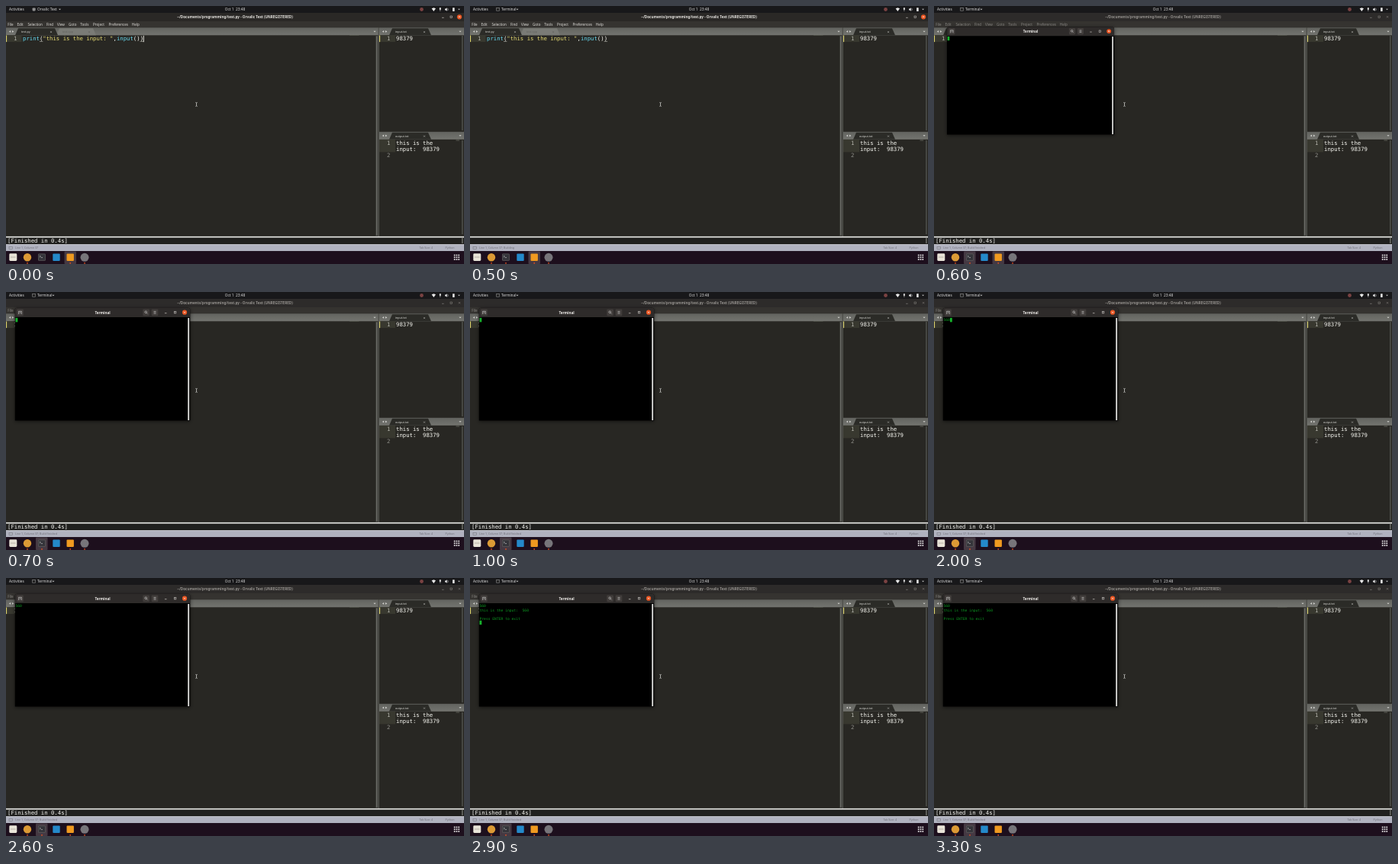
These frames come from a looping animation (600 by 338 pixels, 3400 ms). An HTML page with a canvas:

```html
<!DOCTYPE html>
<html lang="en">
<head>
<meta charset="utf-8">
<title>Editor build opening a terminal</title>
<style>
html, body { margin: 0; width: 100%; height: 100%; overflow: hidden; background: #282723; }
canvas { display: block; }
</style>
</head>
<body>
<canvas id="stage" width="600" height="338"></canvas>
<script>
const ctx = document.getElementById('stage').getContext('2d');
const LOOP = 3400, STEP = 100;
const SANS = '"Noto Sans", "Open Sans", sans-serif';
const MONO = '"DejaVu Sans Mono", "Liberation Mono", monospace';
const CODE = 7.29, CHAR = 4.39;      // editor font size and advance
const SHELL = 4.68, CELL = 2.82, ROW = 5.45;
const APP = 'Orvalic Text';
const ORANGE = '#e95420';

function rect(x, y, w, h, color) {
  ctx.fillStyle = color;
  ctx.fillRect(x, y, w, h);
}

function round(x, y, w, h, r, color) {
  ctx.fillStyle = color;
  ctx.beginPath();
  ctx.roundRect(x, y, w, h, r);
  ctx.fill();
}

function dot(x, y, r, color) {
  ctx.fillStyle = color;
  ctx.beginPath();
  ctx.arc(x, y, r, 0, 7);
  ctx.fill();
}

function poly(color, ...p) {
  ctx.fillStyle = color;
  ctx.beginPath();
  for (let i = 0; i < p.length; i += 2) ctx.lineTo(p[i], p[i + 1]);
  ctx.fill();
}

function line(color, width, ...p) {
  ctx.strokeStyle = color;
  ctx.lineWidth = width;
  ctx.beginPath();
  for (let i = 0; i < p.length; i += 2) ctx.lineTo(p[i], p[i + 1]);
  ctx.stroke();
}

function text(s, x, y, size, color, { font = SANS, weight = 400, align = 'left' } = {}) {
  ctx.font = `${weight} ${size}px ${font}`;
  ctx.textAlign = align;
  ctx.fillStyle = color;
  ctx.fillText(s, x, y);
}

const code = (s, x, y, color = '#f8f8f2') => text(s, x, y, CODE, color, { font: MONO });
const down = (x, y, color, r = 1.6) => poly(color, x - r, y - r / 2, x + r, y - r / 2, x, y + r / 2);

function cross(x, y, r, color, width = .6) {
  line(color, width, x - r, y - r, x + r, y + r);
  line(color, width, x + r, y - r, x - r, y + r);
}

function windowButtons(x, y, gap, color, active) {
  line(color, .7, x - 2 * gap - 1.3, y + 1, x - 2 * gap + 1.3, y + 1);
  ctx.strokeStyle = color;
  ctx.lineWidth = .6;
  ctx.strokeRect(x - gap - 1.2, y - 1.2, 2.4, 2.4);
  if (active) dot(x, y, 3.1, ORANGE);
  cross(x, y, 1.1, active ? '#fff' : color);
}

function topBar(app) {
  rect(0, 0, 600, 9, '#18181a');
  text('Activities', 4, 6.3, 4.75, '#dcdcdc');
  if (app === 'Terminal') {
    round(34, 2, 5, 4.6, .8, '#8a8a8a');
    rect(34.6, 2.7, 3.8, 3.2, '#222');
  } else {
    round(34.6, 2.4, 4, 4, .8, '#909090');
  }
  text(app, 41, 6.3, 4.75, '#dcdcdc');
  down(app === 'Terminal' ? 62 : 70.5, 4.4, '#ccc', 1.5);
  text('Oct 1  23:48', 300, 6.3, 4.75, '#dcdcdc', { align: 'center' });
  dot(544.5, 4.5, 2.4, '#7a4242');
  poly('#e8e8e8', 557.6, 3.3, 560.3, 2.2, 563, 3.3, 560.3, 6.9);
  round(567.8, 1.9, 2, 3.4, 1, '#ddd');
  line('#ddd', .5, 568.8, 5, 568.8, 7);
  poly('#ddd', 575, 3.6, 576.2, 3.6, 577.8, 2.2, 577.8, 6.8, 576.2, 5.4, 575, 5.4);
  line('#ddd', .5, 578.8, 3, 579.3, 4.5, 578.8, 6);
  round(585, 2.2, 2.7, 4.8, .4, '#ddd');
  down(593.5, 4.5, '#ccc', 1.5);
}

function titleAndMenu(focused) {
  const bright = focused ? '#e6e4e0' : '#96938f';
  rect(0, 9, 600, 11, focused ? '#2a2826' : '#2d2b2a');
  text(`~/Documents/programming/test.py - ${APP} (UNREGISTERED)`, 300, 16.1, 4.58, bright,
    { weight: 700, align: 'center' });
  windowButtons(594, 14.3, 10.8, focused ? '#c8c6c2' : '#85827e', focused);
  rect(0, 20, 600, 8.5, '#353330');
  const menu = { File: 2.3, Edit: 14.4, Selection: 28.4, Find: 53, View: 67, Goto: 82,
    Tools: 97.3, Project: 114, Preferences: 134.6, Help: 164.8 };
  for (const name in menu) text(name, menu[name], 25.8, 4.55, focused ? '#dedcd8' : '#8a8884');
}

function tab(x, w, y, label, active) {
  const fill = active ? '#2b2b27' : '#7a7b76';
  poly(fill, x, y + 10, x + 4, y + 1, x + w - 4, y + 1, x + w, y + 10);
  text(label, x + 8, y + 7.1, 3.75, active ? '#dededa' : '#62635e');
  cross(x + w - 9, y + 5.8, 1, active ? '#c4c4c0' : '#5c5d58', .5);
}

function strip(x, w, y) {
  const g = ctx.createLinearGradient(0, y, 0, y + 10);
  g.addColorStop(0, '#62635f');
  g.addColorStop(1, '#73746f');
  rect(x, y, w, 10, g);
  poly('#d0d0cc', x + 6.2, y + 3.7, x + 6.2, y + 6.5, x + 3.8, y + 5.1);
  poly('#d0d0cc', x + 8, y + 3.7, x + 8, y + 6.5, x + 10.4, y + 5.1);
  down(x + w - 5, y + 5.2, '#dededa');
}

function editors(caret) {
  rect(0, 28, 600, 274, '#282723');
  strip(0, 488, 28.3);
  tab(66, 52, 28.3, 'test.cpp', false);
  tab(12, 56, 28.3, 'test.py', true);
  strip(489, 111, 28.3);
  tab(502, 55, 28.3, 'input.txt', true);
  strip(489, 111, 164.8);
  tab(502, 55, 164.8, 'output.txt', true);

  // minimaps
  rect(450, 38.2, 12.5, .7, '#55564f');
  rect(589.5, 175.4, 4.5, 1.2, '#55564f');

  // gutters
  rect(0, 38.5, 20.5, 8.6, '#38382f');
  rect(0, 38.5, 1.1, 8.6, '#d8cf6a');
  rect(489, 38.5, 21, 8.6, '#38382f');
  rect(489, 38.5, 1.1, 8.6, '#d8cf6a');
  rect(489, 175, 21, 16.4, '#38382f');
  code('1', 10, 45.3, '#b4b4ac');
  code('1', 499, 45.3, '#b4b4ac');
  code('1', 499, 181.6, '#b4b4ac');
  code('2', 499, 197.8, '#90908a');

  let x = 22;
  for (const [s, color] of [['print', '#66d9ef'], ['('], ['"this is the input: "', '#e6db74'],
    [','], ['input', '#66d9ef'], ['())']]) {
    code(s, x, 45.3, color);
    x += s.length * CHAR;
  }
  for (const col of [5, 35]) rect(22 + col * CHAR, 46.2, CHAR, .6, '#b8b8b0');
  if (caret) rect(179.8, 38.8, .9, 8.4, '#f8f8f0');
  code('98379', 511, 45.3);
  code('this is the', 511, 181.6);
  code('input:  98379', 511, 189.7);

  // scroll bars and pane divider
  rect(484, 38.5, 3.5, 263, '#3a3b36');
  rect(485, 39.5, 1.5, 261, '#6a6b66');
  rect(487.5, 28.3, 1.5, 273.7, '#50514c');
  rect(597, 39, 1.6, 124, '#4d4e49');
  rect(597, 176, 1.6, 123, '#4d4e49');
}

function bottom(finished, status) {
  rect(0, 301.8, 600, 11, '#20201e');
  rect(0, 301.8, 600, 1.6, '#efefec');
  rect(597, 304, 1.6, 7, '#686964');
  if (finished) code('[Finished in 0.4s]', 2, 309.5, '#f4f4f0');
  rect(0, 312.4, 600, 8.8, '#b0b2bf');
  rect(0, 312.2, 600, .8, '#d0d1d8');
  ctx.strokeStyle = '#77777f';
  ctx.lineWidth = .6;
  ctx.strokeRect(4, 315.5, 4.4, 2.8);
  text('Line 1, Column 37' + status, 12, 318.2, 3.6, '#70707a');
  text('Tab Size: 4', 541.5, 318.2, 3.6, '#70707a');
  text('Python', 575.5, 318.2, 3.6, '#70707a');
}

function dock(running, terminalOn, editorOn) {
  rect(0, 321, 600, 17, '#1d0f1d');
  if (terminalOn) round(39, 321.5, 15.5, 16.5, 1, '#453943');
  if (editorOn) round(76.5, 321.5, 15.5, 16.5, 1, '#453943');
  round(4.3, 324.3, 10, 9.6, 1.4, '#e9e4d8');
  rect(6, 328.6, 6.6, .8, '#aaa498');
  dot(28, 329.3, 5.2, '#dc9a35');
  round(42, 324.5, 9.8, 9.3, 1.3, '#5a5a5a');
  rect(42.8, 325.3, 8.2, 7.6, '#34343a');
  line('#ddd', .6, 44, 327, 45.4, 328.2, 44, 329.4);
  line('#ddd', .6, 46, 329.6, 48, 329.6);
  round(61.3, 324.6, 9.4, 9.4, 1, '#2489ca');
  round(79.5, 324.6, 9.4, 9.4, 1, '#f09a20');
  dot(103, 329.3, 5.5, '#77757a');
  for (const x of [28, 84.2, 103, ...(running ? [47] : [])]) dot(x, 336.8, .9, ORANGE);
  for (let i = 0; i < 9; i++) rect(586.8 + i % 3 * 2.8, 325.6 + (i / 3 | 0) * 2.8, 1.7, 1.7, '#e8e8e8');
}

function pointer() {
  line('#c8c8c4', .7, 248.2, 126.3, 249.5, 126.8, 250.8, 126.3);
  line('#c8c8c4', .8, 249.5, 126.8, 249.5, 131);
  line('#c8c8c4', .7, 248.2, 131.5, 249.5, 131, 250.8, 131.5);
}

// The window grows from the middle of its lower edge.
function terminal(scale, lines, cursor) {
  ctx.save();
  ctx.translate(126.5, 168.6);
  ctx.scale(scale, scale);
  ctx.translate(-126.5, -168.6);
  ctx.shadowColor = 'rgba(0,0,0,.55)';
  ctx.shadowBlur = 5;
  ctx.shadowOffsetY = 1;
  round(11.8, 20.8, 229.4, 147.8, [2.5, 2.5, 0, 0], '#000');
  ctx.shadowColor = 'transparent';
  round(11.8, 20.8, 229.4, 12.3, [2.5, 2.5, 0, 0], '#2e2b2a');
  for (const x of [14.2, 179.3, 190.7]) round(x, 22.4, 8.6, 8.8, 1.2, '#413d3b');
  line('#ddd', .6, 16.6, 29, 16.6, 25.3, 20.4, 25.3, 20.4, 29);
  line('#ddd', .6, 18.5, 26.2, 18.5, 28.2);
  ctx.beginPath();
  ctx.arc(183.2, 26.3, 1.3, 0, 7);
  ctx.stroke();
  line('#ddd', .6, 184.1, 27.2, 185.3, 28.5);
  for (let y = 25.4; y < 29; y += 1.4) line('#ddd', .5, 193.5, y, 196.5, y);
  text('Terminal', 126.5, 28.5, 4.6, '#efedea', { weight: 700, align: 'center' });
  windowButtons(234, 26.7, 12.4, '#cfccc8', true);
  rect(238.2, 34, 1.9, 134, '#d6d6d4');
  lines.forEach((s, i) => text(s, 12.5, 38.2 + i * ROW, SHELL, '#0d9a22', { font: MONO }));
  if (cursor) {
    const row = lines.length - 1;
    rect(12.5 + lines[row].length * CELL, 33.9 + row * ROW, CELL, ROW, '#16b32c');
  }
  ctx.restore();
}

const typed = t => '560'.slice(0, (t >= 1400) + (t >= 1900) + (t >= 2000));

function draw(t) {
  const open = t >= 600, launched = t >= 400, building = t >= 200 && !open;
  const done = t >= 2700;
  topBar(launched ? 'Terminal' : APP);
  titleAndMenu(!open);
  editors(t < 300);
  bottom(!building, building ? '; Building' : open ? '; Build finished' : '');
  dock(launched, open, t < 700);
  pointer();
  if (!open) return;
  const lines = done
    ? ['560', 'this is the input:  560', '', 'Press ENTER to exit', '']
    : [typed(t)];
  const cursor = done ? t < 3300 : t < 2600 && !(t >= 1200 && t < 1400);
  terminal(t < 700 ? .955 : 1, lines, cursor);
}

function tick() {
  draw(Math.floor(performance.now() % LOOP / STEP) * STEP);
  requestAnimationFrame(tick);
}
tick();
</script>
</body>
</html>
```
